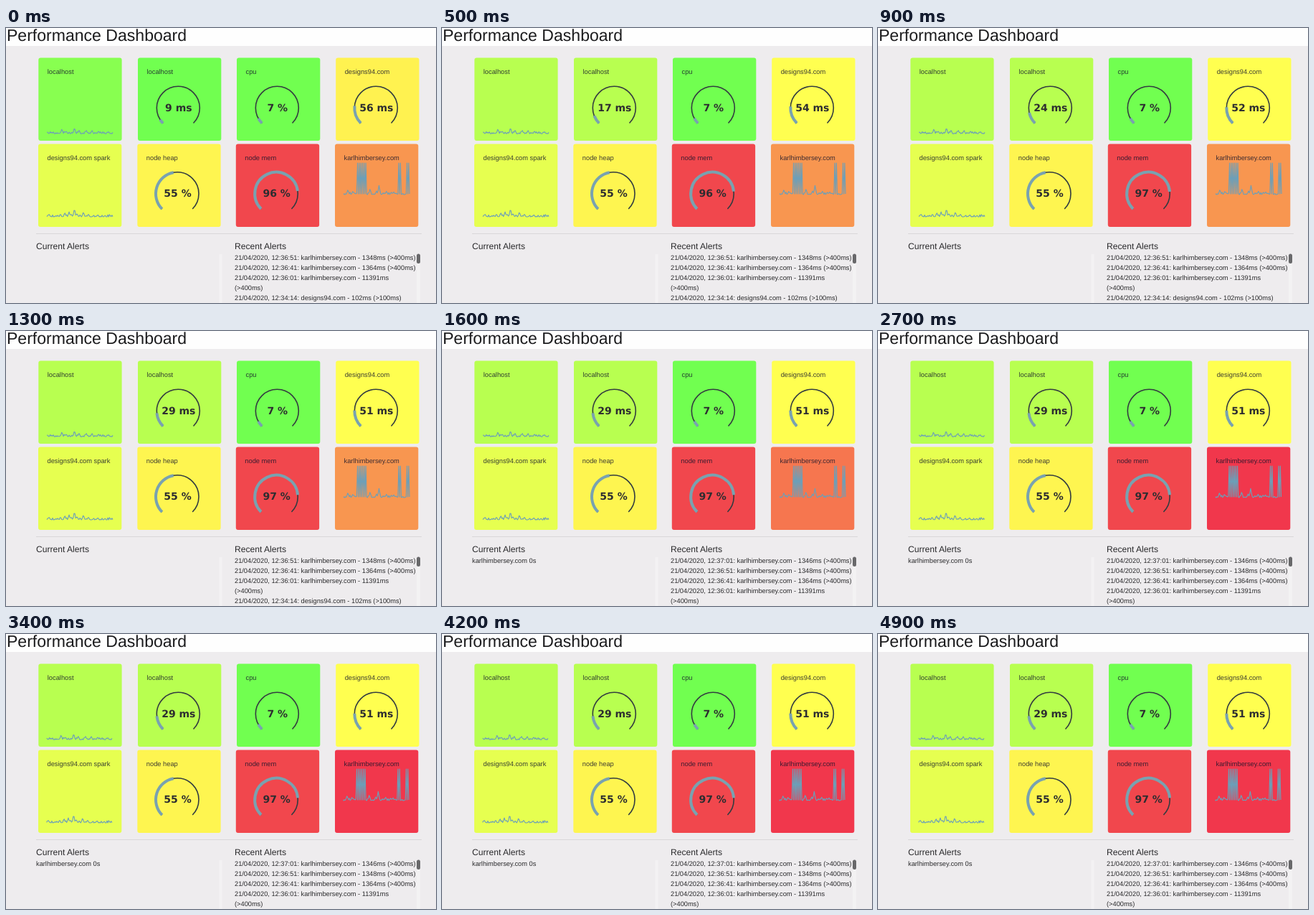
Recreate the animation shown at these times as an HTML page. Size 600 by 383 pixels, loop 5 s.

```html
<!DOCTYPE html>
<html lang="en">
<head>
<meta charset="utf-8">
<title>Performance Dashboard</title>
<style>
  html, body { margin: 0; height: 100%; overflow: hidden; background: #eeecee; }
  svg { display: block; font: 9.25px "Liberation Sans", Arial, sans-serif; fill: #2a2a2c; text-rendering: geometricPrecision; }
  .label { font-size: 9.3px; fill: #14142a; fill-opacity: .82; }
  .value { font: bold 14px "DejaVu Sans", sans-serif; text-anchor: middle; fill: #2d2d30; }
  .head { font-size: 12.1px; }
  .track { fill: none; stroke: #333c40; stroke-width: 1.6; }
  .arc { fill: none; stroke: #79a2b0; stroke-width: 4; }
  .spark { fill: none; stroke: #6c9fb8; stroke-width: 1.15; stroke-linejoin: round; }
</style>
</head>
<body>
<svg id="stage" width="600" height="383" viewBox="0 0 600 383"></svg>
<script>
const LOOP = 5000, COUNT = 1200, ALERT = 1500;
const stage = document.getElementById('stage');
const site = 'karlhimbersey.com';

function add(tag, attrs, text) {
  const el = document.createElementNS('http://www.w3.org/2000/svg', tag);
  for (const k in attrs) el.setAttribute(k, attrs[k]);
  if (text) el.textContent = text;
  return stage.appendChild(el);
}
const rect = (x, y, width, height, fill, rx = 0) => add('rect', { x, y, width, height, fill, rx });
const write = (x, y, text, cls = '') => add('text', { x, y, class: cls }, text);
const clamp = v => Math.max(0, Math.min(1, v));
const mix = (a, b, k) => `rgb(${a.map((v, i) => Math.round(v + (b[i] - v) * k))})`;

const GREEN = [113, 255, 80], LIME = [184, 255, 80], YELLOW = [255, 255, 80];
const ORANGE = [248, 150, 80], RED = [241, 55, 76];

function arcPath(cx, cy, sweep) {
  const r = 30, point = deg => {
    const a = deg * Math.PI / 180;
    return `${cx + r * Math.cos(a)} ${cy + r * Math.sin(a)}`;
  };
  return `M${point(135)}A${r} ${r} 0 ${sweep > 180 ? 1 : 0} 1 ${point(135 + sweep)}`;
}

function tile(x, y, label, from, to = from) {
  const box = rect(x, y, 116.3, 115.5, mix(from, to, 0), 3);
  write(x + 12.5, y + 22.5, label, 'label');
  return k => box.setAttribute('fill', mix(from, to, k));
}

function gauge(cx, cy, from, to, unit, degrees) {
  add('path', { class: 'track', d: arcPath(cx, cy, 270) });
  const arc = add('path', { class: 'arc' });
  const value = write(cx + .5, cy + 4.3, '', 'value');
  return k => {
    const v = from + (to - from) * k;
    arc.setAttribute('d', arcPath(cx, cy, v * degrees));
    value.textContent = Math.round(v) + ' ' + unit;
  };
}

// peaks: [offset, height]; bursts: [start, end] of full-height oscillation
function spark(x0, base, seed, peaks, bursts = []) {
  const line = add('path', { class: 'spark' }), step = 1.15;
  const points = [];
  for (let i = 0; i <= 80; i++) {
    const x = i * step;
    const rnd = Math.abs(Math.sin(i * 78.23 + seed) * 4375.5) % 1;
    let h = rnd * rnd * 3.2;
    for (const [p, top] of peaks) h = Math.max(h, top * (1 - Math.abs(x - p) / 2.2));
    if (bursts.some(([a, b]) => x >= a && x <= b)) h = i % 2 ? 44 : 1;
    points.push([x, base - h]);
  }
  return shift => line.setAttribute('d', 'M' + points
    .map(([x, y]) => `${(x0 + Math.max(0, x - shift)).toFixed(2)} ${y.toFixed(2)}`).join('L'));
}

rect(0, 0, 600, 25, '#fefefe');
add('text', { x: 1, y: 18, style: 'font-size:23.05px;fill:#1c1c1e' }, 'Performance Dashboard');

const localTiles = [
  tile(45.3, 41.5, 'localhost', [136, 255, 80], LIME),
  tile(184, 41.5, 'localhost', GREEN, LIME),
  tile(460.2, 41.5, 'designs94.com', [255, 242, 80], YELLOW)
];
tile(322, 41.5, 'cpu', GREEN);
tile(45, 161.5, 'designs94.com spark', [230, 255, 80]);
tile(183.3, 161.5, 'node heap', [254, 245, 80]);
tile(320.8, 161.5, 'node mem', [241, 71, 77]);
const siteTile = tile(459, 161.5, site, ORANGE, RED);

const gauges = [
  gauge(240.3, 111.3, 9, 29, 'ms', 1.35),
  gauge(378.3, 111.3, 7, 7, '%', 2.27),
  gauge(516.3, 111.3, 56, 51, 'ms', .9),
  gauge(239, 230.8, 55, 55, '%', 2.27),
  gauge(377.2, 230.8, 96, 97, '%', 2.27)
];

const sparks = [
  spark(57, 147.3, 1, [[21, 7], [27, 4], [38.5, 9], [45, 5], [55, 5], [63, 5], [72, 4], [86, 3]]),
  spark(57, 263, 4, [[3, 4], [25, 6], [31, 7], [34, 4], [38.5, 12], [42, 5], [51, 7], [58, 4], [71, 3]]),
  spark(471, 232, 7, [[6, 7], [13, 5], [37, 8], [46, 5], [49.5, 13], [60, 5], [70, 4]],
    [[19.3, 32.5], [76, 80], [86.5, 92]])
];

rect(42, 286, 538, 1, '#d9d7d9');
rect(297.5, 315, 4, 68, '#f3f2f3');
rect(573, 315, 5, 68, '#f3f2f3');
rect(573, 314.5, 5, 13.5, '#68686a', 2.5);
write(42, 308.3, 'Current Alerts', 'head');
write(319, 308.3, 'Recent Alerts', 'head');
const current = write(42, 323.4, site + ' 0s');

const entry = (time, name, ms, limit) => `21/04/2020, ${time}: ${name} - ${ms}ms (>${limit}ms)`;
const before = [
  entry('12:36:51', site, 1348, 400),
  entry('12:36:41', site, 1364, 400),
  ...entry('12:36:01', site, 11391, 400).split(/ (?=\()/),
  entry('12:34:14', 'designs94.com', 102, 100)
];
const after = [entry('12:37:01', site, 1346, 400), ...before];
const rows = before.map((_, i) => write(319, 323.4 + i * 13.85, ''));

function draw(t) {
  const colour = clamp(t / 400), alerted = t >= ALERT;
  localTiles.forEach(f => f(colour));
  siteTile(clamp((t - ALERT) / 300));
  gauges.forEach(f => f(clamp(t / COUNT)));
  const shift = t < 1900 ? 0 : t < 3400 ? .5 : 1.1;
  sparks.forEach(f => f(shift));
  current.setAttribute('visibility', alerted ? 'visible' : 'hidden');
  rows.forEach((row, i) => row.textContent = (alerted ? after : before)[i]);
}

const start = performance.now();
function frame() {
  draw((performance.now() - start) % LOOP);
  requestAnimationFrame(frame);
}
frame();
</script>
</body>
</html>
```
